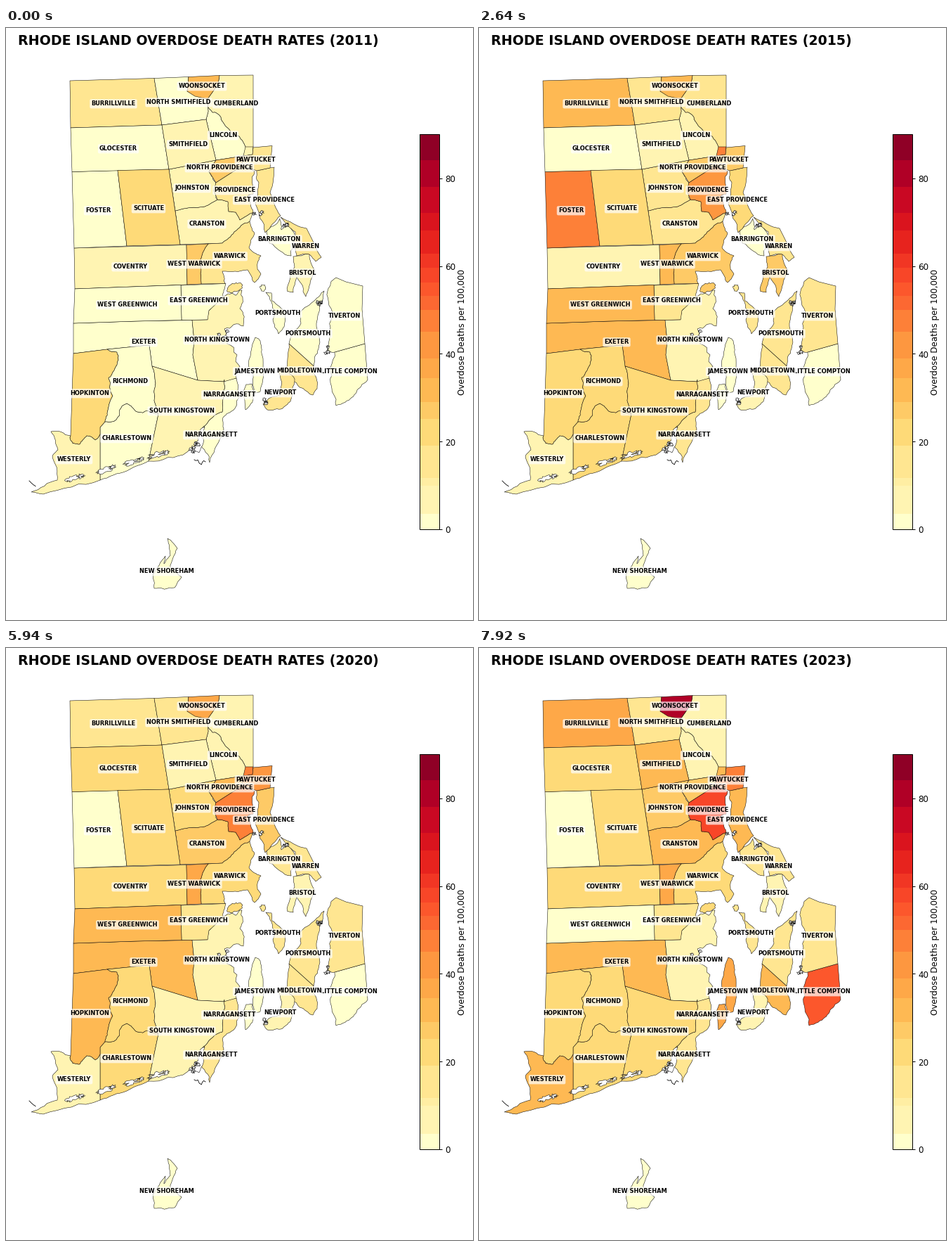
These frames come from a looping animation (665 by 842 pixels, 8.58 s). A matplotlib script:

```python
import numpy as np
import matplotlib.pyplot as plt
from matplotlib.animation import FuncAnimation
from matplotlib.patches import Polygon, Rectangle

W, H, DPI = 665, 842, 100
FRAMES, STEP = 13, 660
FIRST_YEAR = 2011
BOUNDS = [0, 3.5, 10, 11.7, 19, 25.2, 29, 34.5, 39, 45, 50, 53.2, 56.3,
          59.6, 62.9, 68.2, 72.2, 78.1, 84.2, 90.1]

rng = np.random.default_rng(11)
plt.rcParams["font.family"] = "DejaVu Sans"
fig = plt.figure(figsize=(W / DPI, H / DPI), dpi=DPI, facecolor="white")
ax = fig.add_axes([0, 0, 1, 1])
ax.set(xlim=(0, W), ylim=(H, 0))
ax.axis("off")


def pt(px):
    return px * 72 / DPI


def band_colors():
    cmap = plt.get_cmap("YlOrRd")
    mids = [(a + b) / 2 / BOUNDS[-1] for a, b in zip(BOUNDS, BOUNDS[1:])]
    return ["#ffffcc"] + [cmap(m) for m in mids[1:]]


COLORS = band_colors()


def shade(rate):
    return COLORS[np.searchsorted(BOUNDS, rate, side="right") - 1]


def line(*xy):
    return np.reshape(np.array(xy, float), (-1, 2))


def rough(*xy, amp=0.08, depth=3):
    """Polyline with jagged detail added by midpoint displacement."""
    p = line(*xy)
    for _ in range(depth):
        d = np.diff(p, axis=0)
        normal = np.column_stack([-d[:, 1], d[:, 0]])
        shift = rng.normal(0, amp, (len(d), 1)).clip(-2 * amp, 2 * amp)
        out = np.empty((2 * len(p) - 1, 2))
        out[::2] = p
        out[1::2] = p[:-1] + d / 2 + normal * shift
        p = out
    return p


def ring(*xy, **style):
    return rough(*xy, *xy[:2], **style)


def blob(x, y, w, h, tilt=0, bump=0.12):
    """Irregular ellipse, turned by tilt degrees."""
    a = np.linspace(0, 2 * np.pi, 24, endpoint=False)
    r = 1 + bump * rng.normal(0, 1, a.size)
    u, v = r * np.cos(a) * w / 2, r * np.sin(a) * h / 2
    c, s = np.cos(np.radians(tilt)), np.sin(np.radians(tilt))
    return np.column_stack([x + u * c - v * s, y + u * s + v * c])


def shape(*paths):
    return np.vstack(paths)


def outline(points, color="white", z=1):
    return ax.add_patch(Polygon(points, fc=color, ec="black", lw=pt(0.5),
                                joinstyle="round", zorder=z))


towns = []


def town(name, labels, trend, peaks, *shapes):
    """trend: one rate or (first, last); peaks: {rate: years off the trend}."""
    rates = np.linspace(*np.broadcast_to(trend, 2), FRAMES)
    for rate, years in peaks.items():
        rates[np.array(years) + 2000 - FIRST_YEAR] = rate
    towns.append((rates, [outline(s) for s in shapes]))
    for x, y in labels:
        ax.text(x, y + 0.8, name, ha="center", va="center", weight="bold",
                size=pt(8.29), zorder=4,
                bbox=dict(boxstyle="round,pad=0.25", fc="white", ec="none",
                          alpha=0.7))


# Borders shared by two towns
cumb_linc = rough(287, 101, 286, 109, 306, 127, 311, 137, 322, 151, 332, 154,
                  341, 169)
hopk_rich = rough(144, 457, 158, 461, 160, 472, 154, 487, 146, 498, 144, 548,
                  141, 560)
rich_char = rough(141, 560, 157, 557, 172, 534, 187, 546, 217, 549)
hopk_west = rough(92, 580, 95, 591, 105, 592, 115, 580, 127, 586, 134, 578)
john_prov = rough(289, 204, 299, 221, 296, 231, 301, 244)
john_cran = rough(241, 260, 283, 254, 301, 244, amp=.05)
cran_prov = rough(301, 244, 316, 247, 317, 261, 327, 262, 333, 273, 352, 262,
                  amp=.03)
cran_warw = rough(347, 275, 325, 290, 308, 306)
warw_ww = rough(288, 307, 276, 333, 278, 364, amp=.04)
sk_narr = rough(311, 500, 308, 546, 284, 565, 276, 590)
rich_sk = rough(208, 481, 213, 505, 211, 530, 217, 549, amp=.04)

# Towns in alphabetical order, so that later labels cover earlier ones
town("BARRINGTON", [(389, 300)], 15, {0: [11, 15]},
     ring(371, 291, 390, 271, 392, 287, 402, 279, 412, 298, 406, 324,
          375, 306))
town("BRISTOL", [(422, 348)], 7, {27: [15], 21: [19]},
     ring(409, 325, 432, 322, 440, 345, 433, 364, 427, 382, 414, 354,
          409, 376, 401, 375, 411, 340, amp=.06))
town("BURRILLVILLE", [(153, 107)], 15, {31: [15, 21], 37: [23]},
     line(91, 75, 211, 71.5, 222, 138, 92, 142))
town("CENTRAL FALLS", [], (51, 47), {7: [11, 13], 27: [17], 31: [23]},
     line(337, 171, 345, 167, 352, 168, 351, 180, 338, 182))
town("CHARLESTOWN", [(172, 583)], 21, {0: [11, 12], 61: [19]},
     shape(line(134, 568), rich_char, line(208, 592),
           rough(203, 616, 172, 630, 134, 643, amp=.04)))
town("COVENTRY", [(177, 339)], 21, {7: [11, 15], 15: [13], 31: [21]},
     line(97, 313, 257, 308.5, 258, 365, 98, 371))
town("CRANSTON", [(286, 278)], (7, 33), {37: [21]},
     shape(john_cran, cran_prov, cran_warw, line(248, 308)))
town("CUMBERLAND", [(328, 107)], 7, {15: [15]},
     shape(line(304, 67.5, 352, 67, 352, 169), cumb_linc[::-1],
           line(302, 80)))
town("EAST GREENWICH", [(274, 387)], 15, {0: [11, 13, 21]},
     shape(line(249, 366), rough(313, 363.5, 309, 383, 289, 402, 287, 415),
           line(250, 415.5)))
town("EAST PROVIDENCE", [(368, 244)], (15, 31), {7: [13], 40: [17]},
     shape(rough(357, 203, 382, 198, 376, 234, 391, 267, amp=.03),
           rough(391, 267, 369, 291, 355, 250, 360, 220, 357, 203, amp=.06)))
town("EXETER", [(196, 446)], 31, {0: [11, 13, 17]},
     line(96, 420, 185, 417, 265, 415.5, 268, 445, 266, 465, 273, 501,
          208, 481, 204, 451, 144, 457, 96, 463))
town("FOSTER", [(131, 259)], 0, {47: [15, 19]},
     line(94, 204.5, 159, 202.5, 172, 310, 97, 313))
town("GLOCESTER", [(160, 171)], 20, {0: [11, 13, 15, 21]},
     line(92, 142, 222, 138, 232, 201, 94, 204.5))
town("HOPKINTON", [(119, 519)], 21, {0: [13], 12: [18], 31: [20]},
     shape(line(96, 463), hopk_rich, line(134, 568), hopk_west[::-1]))
town("JAMESTOWN", [(354, 488)], 0, {37: [17, 23]},
     ring(355, 440, 362, 445, 366, 470, 362, 517, 354, 520, 352, 494,
          346, 483, amp=.06),
     ring(342, 507, 350, 506, 352, 528, 341, 543))
town("JOHNSTON", [(265, 227)], (7, 27), {40: [17], 27: [19], 47: [21]},
     shape(line(232, 201, 299, 188), john_prov, john_cran[::-1]))
town("LINCOLN", [(309, 152)], 7, {0: [11], 27: [21]},
     shape(cumb_linc, line(338, 182, 299, 188, 285, 130, 288, 119)))
town("LITTLE COMPTON", [(488.7, 488)], 0, {27: [14], 55: [23]},
     shape(line(468, 461, 511, 449),
           rough(515, 500, 500, 515, 486, 530, 470, 537, 462, 505, 468, 461,
                 amp=.07)))
town("MIDDLETOWN", [(417, 487)], 15, {31: [23]},
     shape(line(403, 449),
           rough(438, 480.5, 443, 513, 437, 522, 418, 511, 396, 490, 403, 449,
                 amp=.06)))
town("NARRAGANSETT", [(318, 521), (292, 578)], 15, {2: [11]},
     shape(rough(328, 498, 326, 541, 309, 554, 308, 580, 290, 618, 276, 590),
           sk_narr[::-1]))
town("NEW SHOREHAM", [(229, 772)], 0, {70: [13, 16, 17, 18, 19]},
     ring(230, 726, 244, 740, 234, 768, 250, 781, 240, 796, 211, 797,
          209, 777, 227, 751, 225, 762, 234, 750, amp=.05))
town("NEWPORT", [(390, 518)], 7, {15: [11], 21: [13], 40: [17], 37: [21]},
     ring(389, 485, 411, 499, 405, 531, 394, 541, 372, 543, 366, 535,
          391, 522))
town("NORTH KINGSTOWN", [(301, 443)], 7, {21: [13, 21]},
     shape(line(265, 415.5, 287, 415, 289, 402, 309, 383),
           rough(316, 378, 336, 373, 333, 399, 338, 424, 311, 428, 329, 465,
                 328, 498, amp=.12),
           line(310, 503, 273, 501, 266, 465, 268, 445)))
town("NORTH PROVIDENCE", [(304, 198)], (26, 31),
     {21: [13], 15: [17], 37: [21], 27: [23]},
     line(299, 188, 338, 182, 336, 195, 324, 204, 299, 220, 289, 204))
town("NORTH SMITHFIELD", [(246, 105)], 15, {0: [11], 40: [21]},
     line(211, 71.5, 260, 69.5, 258, 90, 287, 101, 288, 119, 285, 130,
          222, 138))
town("PAWTUCKET", [(356, 187)], (15, 48), {26: [17], 40: [19], 47: [21]},
     line(352, 170, 379, 167.5, 376, 199, 357, 203, 336, 195, 338, 182,
          351, 180))
town("PORTSMOUTH", [(387, 405), (430, 434)], 15, {0: [11], 27: [17]},
     ring(370, 376, 378, 377, 379, 388, 400, 404, 396, 425, 388, 435, 380, 415,
          383, 405, amp=.06),
     blob(366, 370, 8, 8),
     shape(line(438, 480.5),
           rough(403, 449, 420, 420, 418, 405, 440, 387, 453, 374, 442, 420,
                 445, 456, 438, 480.5, amp=.06)))
town("PROVIDENCE", [(326, 230)], (15, 57), {40: [15, 17], 37: [19], 57: [21]},
     shape(line(299, 220, 324, 204, 336, 195),
           rough(354, 204, 352, 236, 344, 239, 352, 262), cran_prov[::-1],
           line(296, 231)))
town("RICHMOND", [(177, 502)], 21, {0: [11, 19, 21]},
     shape(line(204, 451), rich_sk, rich_char[::-1], hopk_rich[::-1]))
town("SCITUATE", [(203, 256)], 20, {0: [13]},
     line(159, 202.5, 232, 201, 248, 308, 172, 310))
town("SMITHFIELD", [(259, 165)], 7, {27: [19], 31: [23]},
     line(222, 138, 285, 130, 299, 188, 232, 201))
town("SOUTH KINGSTOWN", [(250, 544)], 7, {21: [15, 21, 23]},
     shape(line(273, 501, 310, 503), sk_narr,
           rough(276, 590, 258, 603, 203, 616, amp=.05), line(208, 592),
           rich_sk[::-1]))
town("TIVERTON", [(482, 409)], 15, {0: [11]},
     shape(line(470, 355, 484, 361, 508, 367, 507, 400, 511, 449),
           rough(468, 461, 457, 460, 463, 415, 458, 374, 470, 355)))
town("WARREN", [(427, 310)], 15, {0: [13]},
     ring(391, 269, 428, 285, 449, 326, 441, 332, 432, 322, 414, 324,
          412, 290, amp=.04))
town("WARWICK", [(319, 324)], (15, 21), {15: [13], 27: [15, 19], 40: [21]},
     shape(cran_warw[::-1],
           rough(347, 275, 354, 292, 346, 312, 363, 324, 358, 335, 363, 350,
                 354, 362, 344, 344, 308, 346, 312, 363.5),
           warw_ww[::-1]),
     blob(325, 369, 22, 12, -25))
town("WEST GREENWICH", [(173, 393)], 31, {0: [11, 13, 23]},
     line(98, 371, 249, 365.5, 250, 415.5, 185, 417, 96, 420))
town("WEST WARWICK", [(268, 335)], (27, 37), {40: [17], 15: [19], 52: [21]},
     shape(line(258, 365, 257, 308.5), warw_ww))
town("WESTERLY", [(97, 613)], 7, {0: [13], 21: [14, 16, 21], 31: [17, 22, 23]},
     shape(hopk_west,
           rough(134, 643, 53, 663, 36, 660, 73, 643, 66, 610, 74, 600,
                 64, 574, 92, 580, amp=.06)))
town("WOONSOCKET", [(279, 82)], (32, 37),
     {47: [13], 55: [17], 31: [19], 89: [21], 81: [23]},
     line(260, 69.5, 304, 67.5, 302, 80, 287, 101, 269, 97, 258, 90))

# Salt ponds along the south shore, then ragged spots of coast
for x in (95, 140, 180, 216):
    y = 641 - 0.28 * (x - 95)
    outline(blob(x, y, 22, 7, -18, bump=0.3), z=2)
    outline(blob(x + 12, y - 4, 7, 5, bump=0.4), z=2)
outline(ring(275, 604, 268, 600, 277, 571, 283, 567, 280, 593), z=2)
for spot in ((262, 600), (272, 592), (309, 437), (460, 460), (447, 391),
             (369, 533), (397, 280), (362, 264)):
    for dx, dy in rng.normal(0, 3, (3, 2)):
        outline(blob(spot[0] + dx, spot[1] + dy, 4, 4, bump=0.4), z=3)
for path in (rough(33, 644, 42, 652), rough(268, 614, 284, 617, amp=.3)):
    ax.plot(*path.T, color="black", lw=pt(0.8), zorder=3)

# Colour scale
BAR_X, BAR_W, BAR_TOP, BAR_BOTTOM = 589, 28, 151, 713
UNIT = (BAR_BOTTOM - BAR_TOP) / BOUNDS[-1]
for low, high, color in zip(BOUNDS, BOUNDS[1:], COLORS):
    ax.add_patch(Rectangle((BAR_X, BAR_BOTTOM - high * UNIT), BAR_W,
                           (high - low) * UNIT, fc=color, ec="none",
                           antialiased=False))
ax.add_patch(Rectangle((BAR_X, BAR_TOP), BAR_W, BAR_BOTTOM - BAR_TOP,
                       fc="none", ec="black", lw=pt(1), zorder=3))
for tick in range(0, 81, 20):
    y = BAR_BOTTOM - tick * UNIT
    ax.plot([BAR_X + BAR_W, BAR_X + BAR_W + 4], [y, y], color="black",
            lw=pt(1), solid_capstyle="butt")
    ax.text(BAR_X + BAR_W + 8.5, y + 0.5, str(tick), size=pt(11.85),
            va="center_baseline")
ax.text(650, 432.5, "Overdose Deaths per 100,000", size=pt(11.85),
        rotation=90, ha="center", va="center")
title = ax.text(273.5, 23.6, "", size=pt(18.95), weight="bold", ha="center",
                va="baseline")


def update(i):
    title.set_text(f"RHODE ISLAND OVERDOSE DEATH RATES ({FIRST_YEAR + i})")
    for rates, patches in towns:
        for patch in patches:
            patch.set_facecolor(shade(rates[i]))
    return [title]


anim = FuncAnimation(fig, update, frames=FRAMES, interval=STEP, repeat=True,
                     repeat_delay=0)
plt.show()
```
